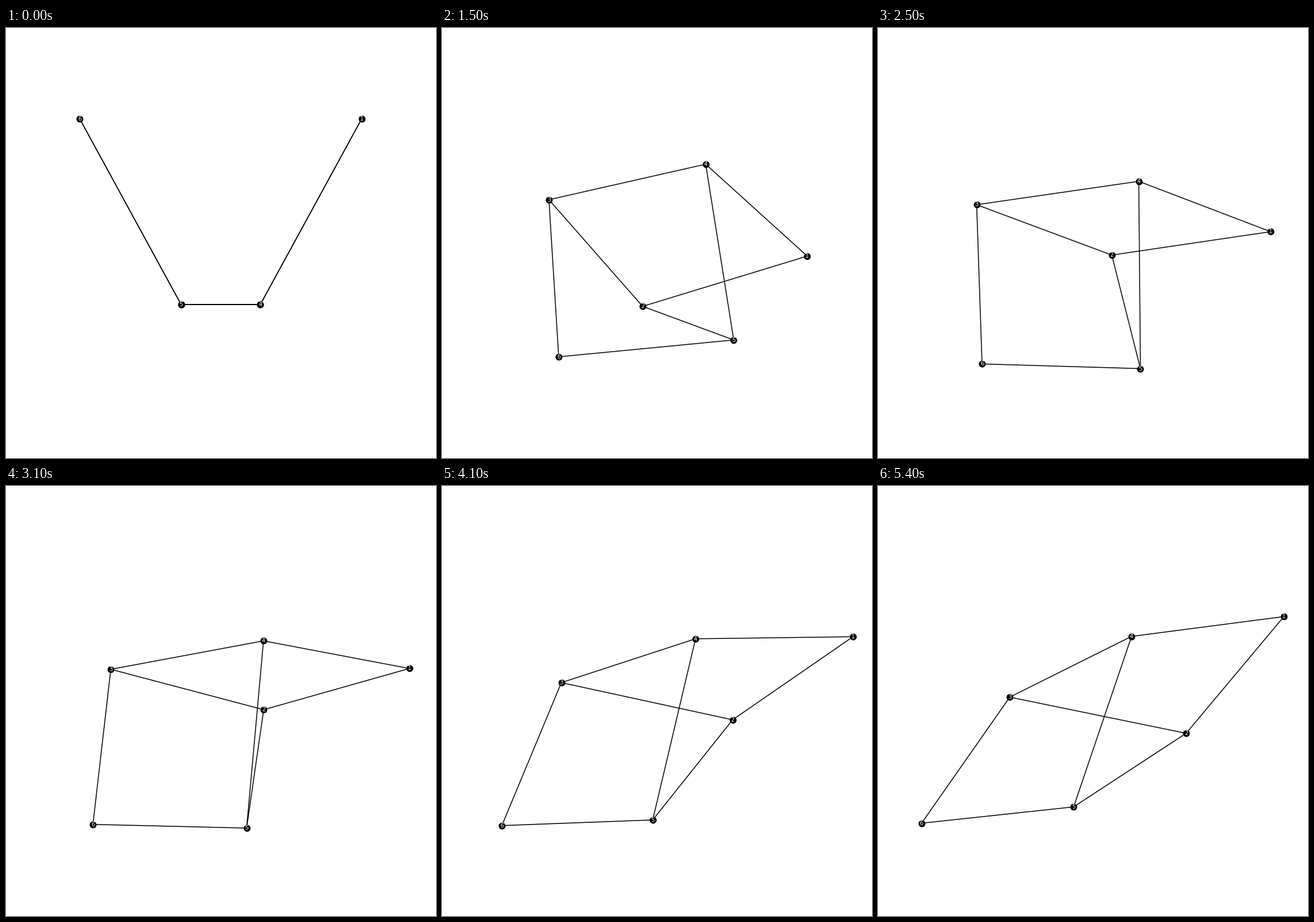
These frames come from a looping animation (748x748 px, 5500 ms). A matplotlib script:

```python
import numpy as np
import matplotlib.pyplot as plt
from matplotlib.animation import FuncAnimation

SIZE, DPI = 748, 100
FRAMES, INTERVAL = 55, 100

EDGES = [(1, 2), (1, 4), (2, 3), (2, 5), (3, 4), (3, 6), (4, 5), (5, 6)]

# Key poses of nodes 1 to 6 while the graph relaxes
POSES = {
    7: [(590, 396.7), (341.7, 554.2), (187.7, 287.8),
        (448.4, 218.3), (523.6, 523.7), (222.7, 517.2)],
    15: [(635.3, 396.8), (349, 484.2), (186, 298.7),
         (458.7, 236.9), (507.5, 542.7), (203, 572)],
    25: [(683, 354.3), (406.7, 395), (171.6, 307.4),
         (453.6, 266.7), (456.5, 592.5), (181, 584.4)],
    37: [(712.8, 281.2), (486.7, 400.2), (198.5, 332.3),
         (442.6, 266.8), (383.4, 587.2), (119.8, 590.8)],
    54: [(706, 227.2), (536, 430.2), (229.2, 367.3),
         (441.1, 261.6), (340.3, 558.2), (75.8, 586.6)],
}
BURST, DECAY = 2, 0.4

times = np.array(list(POSES))
poses = np.array(list(POSES.values()))
slopes = np.gradient(poses, times, axis=0)
slopes[-1] = 0


def spectral_layout():
    """Two Laplacian eigenvectors; 2 and 4 coincide, as do 3 and 5."""
    a = (np.sqrt(17) - 3) / 4
    x = np.array([1, a, -a, a, -a, -1])
    y = np.array([-2, 1, 1, 1, 1, -2])
    unit = np.column_stack([x / np.linalg.norm(x), y / np.linalg.norm(y)])
    return SIZE / 2 - 0.5 + unit * 373


def relaxed(t):
    """Cubic Hermite path through the key poses."""
    i = min(np.searchsorted(times, t, side="right") - 1, len(times) - 2)
    h = times[i + 1] - times[i]
    u = (t - times[i]) / h
    ease = u * u * (3 - 2 * u)
    return (poses[i] + (poses[i + 1] - poses[i]) * ease
            + h * u * (1 - u) * ((1 - u) * slopes[i] - u * slopes[i + 1]))


def layout(frame):
    if frame == 0:
        return start
    if frame < times[0]:
        # Nodes shoot past their places and fall back
        return poses[0] + BURST * DECAY ** (frame - 1) * (poses[0] - start)
    return relaxed(frame)


start = spectral_layout()

fig = plt.figure(figsize=(SIZE / DPI, SIZE / DPI), dpi=DPI, facecolor="white")
ax = fig.add_axes([0, 0, 1, 1])
ax.set_xlim(0, SIZE)
ax.set_ylim(SIZE, 0)
ax.axis("off")

lines = [ax.plot([], [], color="black", lw=1.1, zorder=1)[0] for _ in EDGES]
dots, labels = [], []
for node in range(1, 7):
    dots.append(ax.plot([], [], "o", color="black", ms=8.6, mew=0,
                        snap=False, zorder=2 * node)[0])
    labels.append(ax.text(0, 0, str(node), color="white", fontsize=7,
                          family="DejaVu Sans", ha="center", va="center",
                          zorder=2 * node + 1, clip_on=True))


def draw(frame):
    pos = layout(frame)
    for line, (a, b) in zip(lines, EDGES):
        line.set_data(*pos[[a - 1, b - 1]].T)
    for dot, label, (x, y) in zip(dots, labels, pos):
        dot.set_data([x], [y])
        label.set_position((x, y))
    return lines + dots + labels


anim = FuncAnimation(fig, draw, frames=FRAMES, interval=INTERVAL,
                     repeat=True, repeat_delay=0, blit=False)
plt.show()
```
